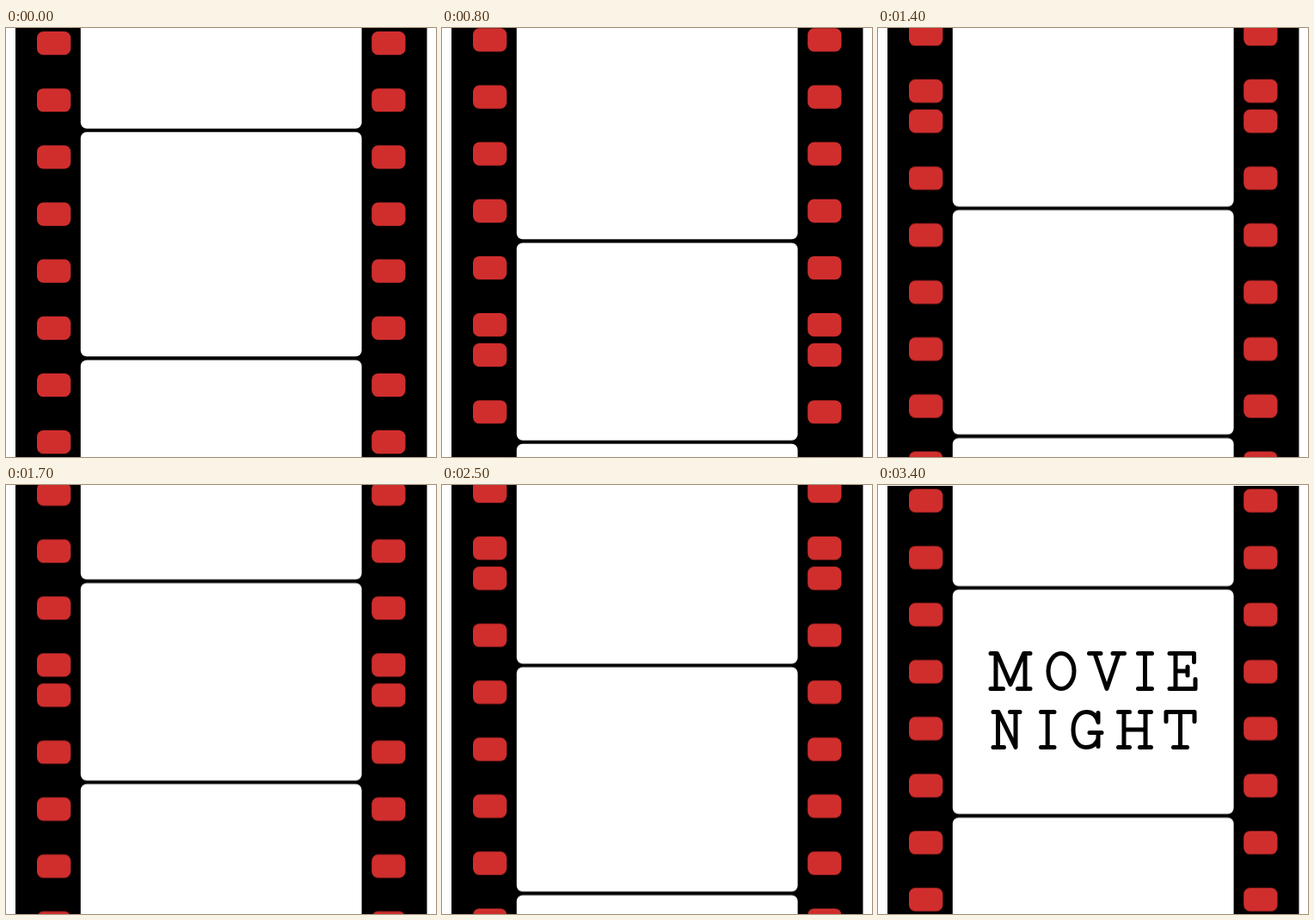
These frames come from a looping animation (500 by 498 pixels, 8000 ms). An HTML page:

```html
<!DOCTYPE html>
<html lang="en">
<head>
<meta charset="utf-8">
<title>Movie Night</title>
<style>
  html, body { margin: 0; width: 100%; height: 100%; overflow: hidden; background: #fff; }
  svg { display: block; width: 100vw; height: 100vh; }

  /* 11 steps of 100 ms per film frame, with one short rest after the first */
  .reel  { animation: roll 8s -4ms infinite; }
  .words { animation: drop 8s -4ms infinite; }
  @keyframes roll {
    0%     { transform: translateY(0);        animation-timing-function: steps(11); }
    13.75% { transform: translateY(497.6px);  animation-timing-function: steps(1); }
    15%    { transform: translateY(498px);    animation-timing-function: steps(11); }
    28.75% { transform: translateY(996px);    animation-timing-function: steps(11); }
    42.5%, 100% { transform: translateY(1494.6px); }
  }
  @keyframes drop {
    0%, 28.75% { transform: translateY(-385px); animation-timing-function: steps(11); }
    42.5%, 100% { transform: translateY(0); }
  }

  .ink { fill: none; stroke: #000; stroke-width: 5; stroke-linecap: round; stroke-linejoin: round; }
  text { font: 58px "Noto Serif", serif; fill: transparent; text-anchor: middle; }
</style>
</head>
<body>
<svg viewBox="0 0 500 498" preserveAspectRatio="none">
  <defs>
    <g id="hole" fill="#d02e2d">
      <rect x="36" width="39.3" height="27.2" rx="7.5"/>
      <rect x="425.2" width="39.3" height="27.2" rx="7.5"/>
    </g>
    <g id="strip">
      <rect x="11" width="478.5" height="498"/>
      <g fill="#fff">
        <path d="M86.8 0H413.6V109.8a7 7 0 0 1-7 7H93.8a7 7 0 0 1-7-7Z"/>
        <rect x="86.8" y="120.8" width="326.8" height="260.4" rx="7"/>
        <path d="M86.8 498V392.4a7 7 0 0 1 7-7H406.6a7 7 0 0 1 7 7V498Z"/>
      </g>
      <use href="#hole" y="4"/>
      <use href="#hole" y="70.15"/>
      <use href="#hole" y="136.3"/>
      <use href="#hole" y="202.45"/>
      <use href="#hole" y="268.6"/>
      <use href="#hole" y="334.75"/>
      <use href="#hole" y="400.9"/>
      <use href="#hole" y="467.05"/>
    </g>
  </defs>

  <g class="reel">
    <use href="#strip"/>
    <use href="#strip" y="-498"/>
    <use href="#strip" y="-996"/>
    <use href="#strip" y="-1494"/>
  </g>

  <g class="words">
    <text x="250" y="238">MOVIE</text>
    <text x="250" y="306">NIGHT</text>
    <!-- typewriter lettering, caps 41 units high -->
    <g class="ink" aria-hidden="true">
      <g transform="translate(0 195.5)">
        <path d="M131 0H138.5L154 36L169.5 0H177M137 1V41M171 1V41M131 41H145.5M162.5 41H177"/>
        <ellipse cx="213" cy="20.5" rx="15" ry="20.5"/>
        <path d="M245.5 0H259M273 0H286.500M252 0L266 41L280 0"/>
        <path d="M302.500 0H318.500M302.500 41H318.500M310.500 0V41"/>
        <path d="M339 0H367.500V10M339 41H369V30M346 0V41M346 20.500H360M360 15.500V25.500"/>
      </g>
      <g transform="translate(0 263.5)">
        <path d="M134 0H140L160 41V0M153.500 0H165M139.500 1V41M134 41H146.500"/>
        <path d="M189.500 0H205M189.500 41H205M197.200 0V41"/>
        <path d="M256 1V12C254 4 249 0 242.500 0C232.500 0 227 9 227 20.500C227 32 232.500 41 242 41C249 41 254 37 256 31M256 24V40M246 24H260"/>
        <path d="M279.500 0H292.500M304.500 0H317.500M279.500 41H292.500M304.500 41H317.500M286 0V41M311 0V41M286 20.500H311"/>
        <path d="M335 11V0H368V11M351.500 0V41M343.500 41H359.500"/>
      </g>
    </g>
  </g>
</svg>
</body>
</html>
```
